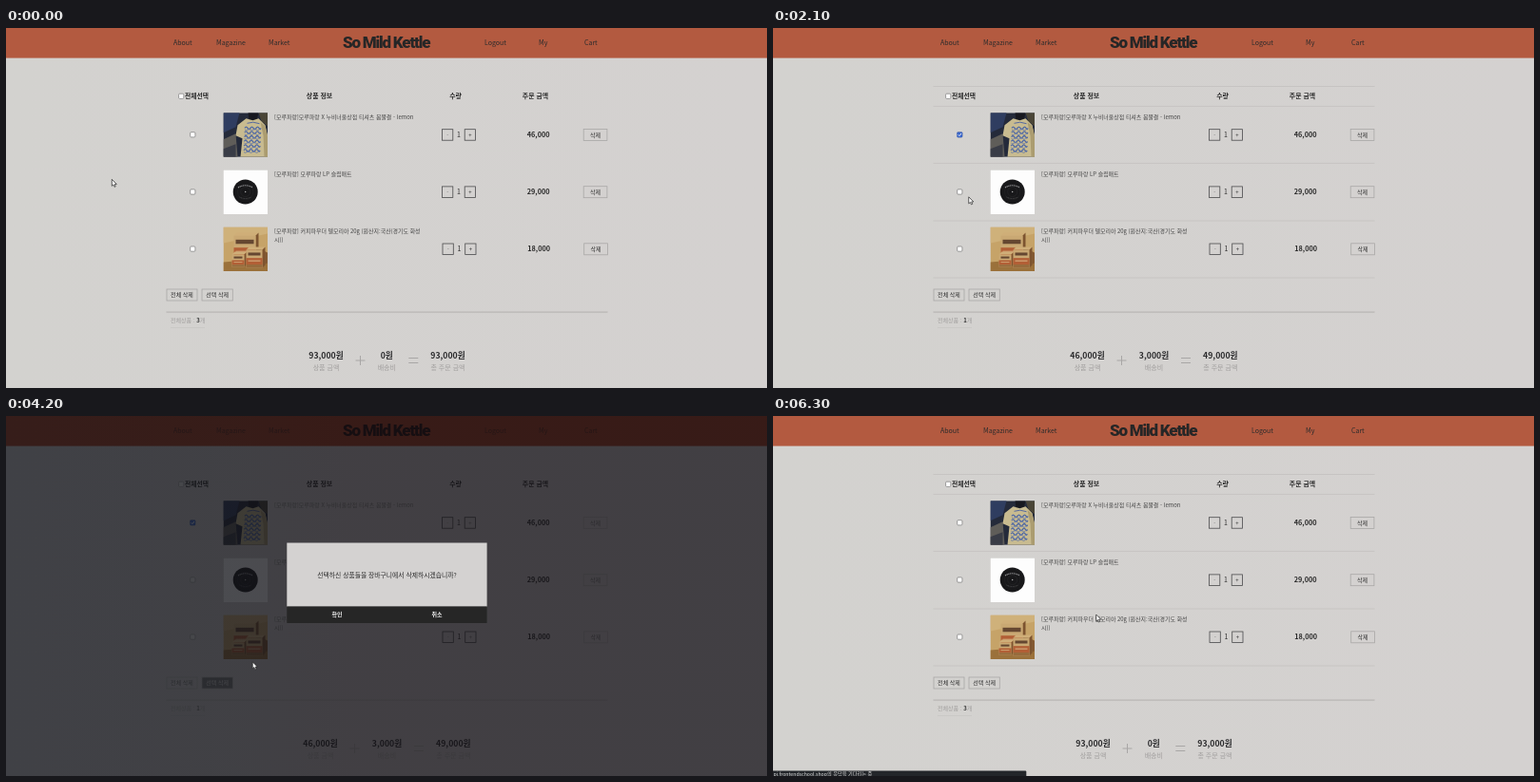
Animation of 800 by 379 pixels, one loop 8000 ms. Source, as an HTML page:

```html
<!DOCTYPE html>
<html lang="ko">
<head>
<meta charset="utf-8">
<title>Cart</title>
<style>
html, body { margin: 0; width: 100%; height: 100%; overflow: hidden; background: #d4d2d0; }
svg { display: block; width: 100%; height: 100%; }
text { font-family: "Noto Sans CJK KR", "Noto Sans KR", "Noto Sans CJK", sans-serif; fill: #2c2c2c; white-space: pre; }
.brand { font-family: Roboto, "Open Sans", sans-serif; font-weight: 900; letter-spacing: -1.2px; fill: #262626; }
</style>
</head>
<body>
<svg id="stage" viewBox="0 0 800 379">
  <defs>
    <linearGradient id="paper">
      <stop offset="0" stop-color="#d3d2cf"/>
      <stop offset="1" stop-color="#d4d1d0"/>
    </linearGradient>
    <linearGradient id="dim">
      <stop offset="0" stop-color="#00030a"/>
      <stop offset=".3" stop-color="#010208"/>
      <stop offset=".45" stop-color="#020006"/>
      <stop offset="1" stop-color="#020006"/>
    </linearGradient>
    <clipPath id="photo"><rect width="46.5" height="46.5"/></clipPath>
  </defs>
</svg>
<script>
const NS = 'http://www.w3.org/2000/svg';
const stage = document.getElementById('stage');

function add(parent, tag, attrs = {}, content) {
  const el = document.createElementNS(NS, tag);
  for (const k in attrs) el.setAttribute(k, attrs[k]);
  if (content !== undefined) el.textContent = content;
  parent.appendChild(el);
  return el;
}
const group = (parent, x = 0, y = 0) => add(parent, 'g', { transform: `translate(${x} ${y})` });
const rect = (p, x, y, width, height, fill, more) => add(p, 'rect', { x, y, width, height, fill, ...more });
const path = (p, d, fill, more) => add(p, 'path', { d, fill, ...more });
const label = (p, x, y, size, str, more) => add(p, 'text', { x, y, 'font-size': size, ...more }, str);
const mid = (p, x, y, size, str, more) => label(p, x, y, size, str, { 'text-anchor': 'middle', ...more });
const place = (el, x, y) => el.setAttribute('transform', `translate(${x} ${y})`);
const show = (el, on) => el.setAttribute('visibility', on ? 'visible' : 'hidden');

function checkbox(p, x, y) {
  rect(p, x, y, 5.2, 5.2, '#fff', { rx: 1, stroke: '#777', 'stroke-width': .7 });
}

function button(p, x, y, w, str) {
  const box = rect(p, x, y, w, 12, '#37383c', { 'fill-opacity': 0, stroke: '#a9a7a6', 'stroke-width': .8 });
  const text = mid(p, x + w / 2, y + 8.4, 6, str);
  return { box, text };
}

// Page
rect(stage, 0, 0, 800, 379, 'url(#paper)');
rect(stage, 0, 0, 800, 31.6, '#b35a40');
const solid = group(stage);
const fine = group(stage);

mid(solid, 399.6, 21, 17, 'So Mild Kettle', { class: 'brand' });
[[176, 'About'], [221, 'Magazine'], [276, 'Market'], [503, 'Logout'], [560, 'My'], [608, 'Cart']]
  .forEach(([x, str]) => label(fine, x, 17.6, 7, str));

const bold = { 'font-weight': 700, style: 'fill:#2a2a2a' };
checkbox(fine, 181.6, 69.2);
label(solid, 188, 74.4, 6.8, '전체선택', bold);
mid(solid, 329.5, 74.4, 6.9, '상품 정보', bold);
mid(solid, 472.5, 74.4, 6.9, '수량', bold);
mid(solid, 556.5, 74.4, 6.9, '주문 금액', bold);

const lines = group(stage);
[61.5, 82.3, 142.3, 203, 263].forEach(y => rect(lines, 168.5, y - .4, 464, .8, '#c3c1bf'));
rect(fine, 168.5, 298.6, 464, .9, '#aeacaa');

// Product pictures
function shirt(g) {
  rect(g, 0, 0, 46.5, 46.5, '#242a3a');
  path(g, 'M0 0H17L13 15L0 21Z', '#2f3d60');
  path(g, 'M0 28L13 22L15 46.5H0Z', '#5f5d59');
  path(g, 'M0 38L13 33V46.5H0Z', '#393c46');
  path(g, 'M37 0H46.5V14L40 9Z', '#4a4537');
  path(g, 'M26 0H37L35 8H27Z', '#17181f');
  path(g, 'M15 13L24 6L31 8L37 6L44 13L46.5 24V46.5H18L20 27L13 24Z', '#c8bb90');
  path(g, 'M39 10L44 14L46.5 25V46.5H43L42 24Z', '#ab9c70');
  for (let i = 0; i < 6; i++) {
    const y = 16 + i * 4.7;
    path(g, `M${22.5 - i * .2} ${y}q1.5 -2.4 3 0t3 0t3 0t3 0t3 0t2 0`, 'none', { stroke: '#4f68a4', 'stroke-width': 1.3 });
    path(g, `M${22.5 - i * .2} ${y + 1.8}q1.5 1.6 3 0t3 0t3 0t3 0t3 0`, 'none', { stroke: '#6a7ca6', 'stroke-width': .9 });
  }
  path(g, 'M25 11Q31 8.6 38 11.4', 'none', { stroke: '#5569a0', 'stroke-width': 1 });
}

function record(g) {
  rect(g, 0, 0, 46.5, 46.5, '#fdfdfd');
  const ring = (r, fill, stroke = 'none') =>
    add(g, 'circle', { cx: 23.2, cy: 23, r, fill, stroke, 'stroke-width': .4 });
  ring(13, '#18181a');
  ring(8.2, 'none', '#29292b');
  ring(5, 'none', '#323234');
  ring(.7, '#bbb');
  path(g, 'M15.5 18.5Q23 14 31 18.5', 'none', { stroke: '#8e8e90', 'stroke-width': 1.2, 'stroke-dasharray': '1.2 .6' });
  path(g, 'M17 28.5Q23 31.5 29.5 28.5', 'none', { stroke: '#58585a', 'stroke-width': .7, 'stroke-dasharray': '1 .6' });
}

function carton(g, x, y, w, h) {
  path(g, `M${x} ${y}l3 -3h${w}l-3 3Z`, '#cfae78');
  path(g, `M${x + w} ${y}l3 -3v${h}l-3 3Z`, '#7d5430');
  rect(g, x, y, w, h, '#c9a873');
  rect(g, x, y + h * .45, w, h * .36, '#b25f36');
  rect(g, x, y + h * .81, w, h * .19, '#976b3d');
  rect(g, x + 2, y + h * .15, w - 4, h * .16, '#654731');
  rect(g, x + 2, y + h * .57, w - 4, h * .08, '#cc9a6c');
}

function boxes(g) {
  rect(g, 0, 0, 46.5, 46.5, '#c6a368');
  path(g, 'M0 0H46.5V7L0 17Z', '#cfb17a');
  path(g, 'M0 37L46.5 33V46.5H0Z', '#9b713b');
  path(g, 'M36 22L46.5 27V38L35 42Z', '#855b33');
  carton(g, 11, 9, 23, 28);
  carton(g, 9, 29, 13, 13);
  carton(g, 24, 24, 17, 19);
}

// Cart rows
const items = [
  { art: shirt, y: 112.5, dx: 0, price: '46,000', name: ['[모루파랑]모루파랑 X 누비너울상점 티셔츠 봄물결 - lemon'] },
  { art: record, y: 172.7, dx: 0, price: '29,000', name: ['[모루파랑] 모루파랑 LP 슬립매트'] },
  { art: boxes, y: 232.8, dx: .5, price: '18,000', name: ['[모루파랑] 커피파우더 델모리아 20g (원산지:국산(경기도 화성', '시))'] }
];
items.forEach(({ art, y, dx, price, name }) => {
  checkbox(fine, 193.7, y - 2.8);
  const pic = group(solid, 228.5, y - 23.2);
  pic.setAttribute('clip-path', 'url(#photo)');
  art(pic);
  name.forEach((str, i) => label(fine, 282, y - 16.5 + i * 8.6, 5.95, str, { style: 'fill:#444' }));
  [458.5, 482.2].forEach(x =>
    rect(solid, x + dx, y - 5.8, 11.3, 11.5, 'none', { stroke: '#4a4a4c', 'stroke-width': .8 }));
  mid(fine, 464.2 + dx, y + 2, 6, '-', { style: 'fill:#777' });
  mid(fine, 487.9 + dx, y + 2, 6, '+');
  mid(solid, 476 + dx, y + 2.6, 7, '1');
  mid(solid, 559.7 + dx, y + 2.6, 7.3, price, bold);
  button(fine, 607.2 + dx, y - 6, 24.7, '삭제');
});

const tick = group(stage, 193.7, 109.7);
rect(tick, -.3, -.3, 5.8, 5.8, '#3b66c8', { rx: 1 });
path(tick, 'M1 2.7L2.2 3.9L4.3 1.3', 'none', { stroke: '#fff', 'stroke-width': .9 });

button(fine, 169, 275, 32, '전체 삭제');
const pick = button(fine, 206, 275, 32.3, '선택 삭제');

const grey = { style: 'fill:#a09e9d' };
const count = label(fine, 173, 310, 6, '전체상품 : ', grey);
const countNum = add(count, 'tspan', { 'font-weight': 700, fill: '#333' });
add(count, 'tspan', {}, '개');
rect(fine, 173, 315.4, 36, .6, '#c5c3c1');

// Totals
const sums = ['상품 금액', '배송비', '총 주문 금액'].map(str => ({
  value: mid(solid, 0, 347.5, 8.7, '', { 'font-weight': 700, style: 'fill:#2a2a2c' }),
  note: mid(fine, 0, 360.1, 7, str, grey)
}));
const sign = { stroke: '#a8a6a5', 'stroke-width': 1 };
const plus = path(fine, 'M-5 350H5M0 345V355', 'none', sign);
const equal = path(fine, 'M-5 347.5H5M-5 352.5H5', 'none', sign);

function setTotals(values, xs, plusX, equalX, n) {
  sums.forEach(({ value, note }, i) => {
    value.textContent = values[i] + '원';
    value.setAttribute('x', xs[i]);
    note.setAttribute('x', xs[i]);
  });
  place(plus, plusX, 0);
  place(equal, equalX, 0);
  countNum.textContent = n;
}

// Dialog
const dialog = group(stage);
rect(dialog, 0, 0, 800, 379, 'url(#dim)', { opacity: .7 });
rect(dialog, 295.3, 133.5, 210.3, 67.2, '#d4d2d1');
rect(dialog, 295.3, 200.5, 210.3, 17.5, '#262626');
const okBox = rect(dialog, 295.3, 200.5, 105.2, 17.5, '#3c3e44');
mid(dialog, 400.5, 169.6, 6.8, '선택하신 상품들을 장바구니에서 삭제하시겠습니까?');
const white = { 'font-weight': 700, style: 'fill:#f2f2f2' };
mid(dialog, 348, 211.2, 6, '확인', white);
mid(dialog, 453, 211.2, 6, '취소', white);

// Browser status bar
const status = group(stage);
rect(status, -2, 373.4, 268.3, 8, '#23262a', { rx: 1 });
label(status, -2.5, 378.8, 5.2, 'api.frontendschool.shop의 응답을 기다리는 중', { style: 'fill:#dcdcdc' });

// Pointers
const ink = { stroke: '#222', 'stroke-width': .7, 'stroke-linejoin': 'round' };
const arrow = path(stage, 'M0 0V7L1.6 5.6L2.7 8L3.9 7.5L2.9 5.1H5Z', '#fff', ink);
const hand = path(stage,
  'M-.6 .4Q.2 -.6 .9 .4V4L1.6 3.5L2.4 4.1L3.2 3.7L3.9 4.4L4.8 4.3V7.3L4 10H0L-2.4 6.6Q-2.2 5.4 -.6 6.6Z', '#fff', ink);

const ramp = (t, a, b) => Math.min(1, Math.max(0, (t - a) / (b - a)));
const ease = p => p * p * (3 - 2 * p);
const within = (t, a, b) => t >= a && t < b;

const moves = [
  { from: 500, to: 1100, x: 195.2, y: 110.2 },
  { from: 1800, to: 2500, x: 222, y: 282 },
  { from: 3900, to: 4700, x: 339.7, y: 209 }
];
function pointerAt(t) {
  let x = 111.3, y = 159.3;
  for (const m of moves) {
    const p = ease(ramp(t, m.from, m.to));
    x += (m.x - x) * p;
    y += (m.y - y) * p;
  }
  return [x, y];
}

function draw(ms) {
  const t = Math.floor(ms / 100) * 100;
  const modal = within(t, 3500, 5500);
  const chosen = within(t, 1600, 4600);

  show(tick, chosen);
  if (within(t, 1700, 4600)) setTotals(['46,000', '3,000', '49,000'], [330.5, 400.5, 470.3], 366.5, 434, 1);
  else setTotals(['93,000', '0', '93,000'], [336.5, 400.3, 464.5], 372.5, 428.3, 3);

  const over = chosen ? ramp(t, 2300, 2700) : 0;
  pick.box.setAttribute('fill-opacity', over);
  const tone = Math.round(44 + 196 * over);
  pick.text.style.fill = `rgb(${tone},${tone},${tone})`;

  show(dialog, modal);
  okBox.setAttribute('opacity', ramp(t, 4500, 4900));
  fine.setAttribute('opacity', modal ? .45 : 1);
  solid.setAttribute('opacity', modal ? .8 : 1);
  tick.setAttribute('opacity', modal ? .8 : 1);
  lines.setAttribute('opacity', modal ? 0 : t < 3500 ? ramp(t, 0, 300) : ramp(t, 5500, 5800));
  show(status, t >= 6300);

  const [x, y] = pointerAt(t);
  const link = within(t, 2400, 3500) || within(t, 4600, 5500);
  show(hand, link);
  show(arrow, !link);
  place(hand, x, y);
  place(arrow, x, y);
}

const start = performance.now();
function loop(now) {
  draw(Math.max(0, now - start) % 8000);
  requestAnimationFrame(loop);
}
draw(0);
requestAnimationFrame(loop);
</script>
</body>
</html>
```
